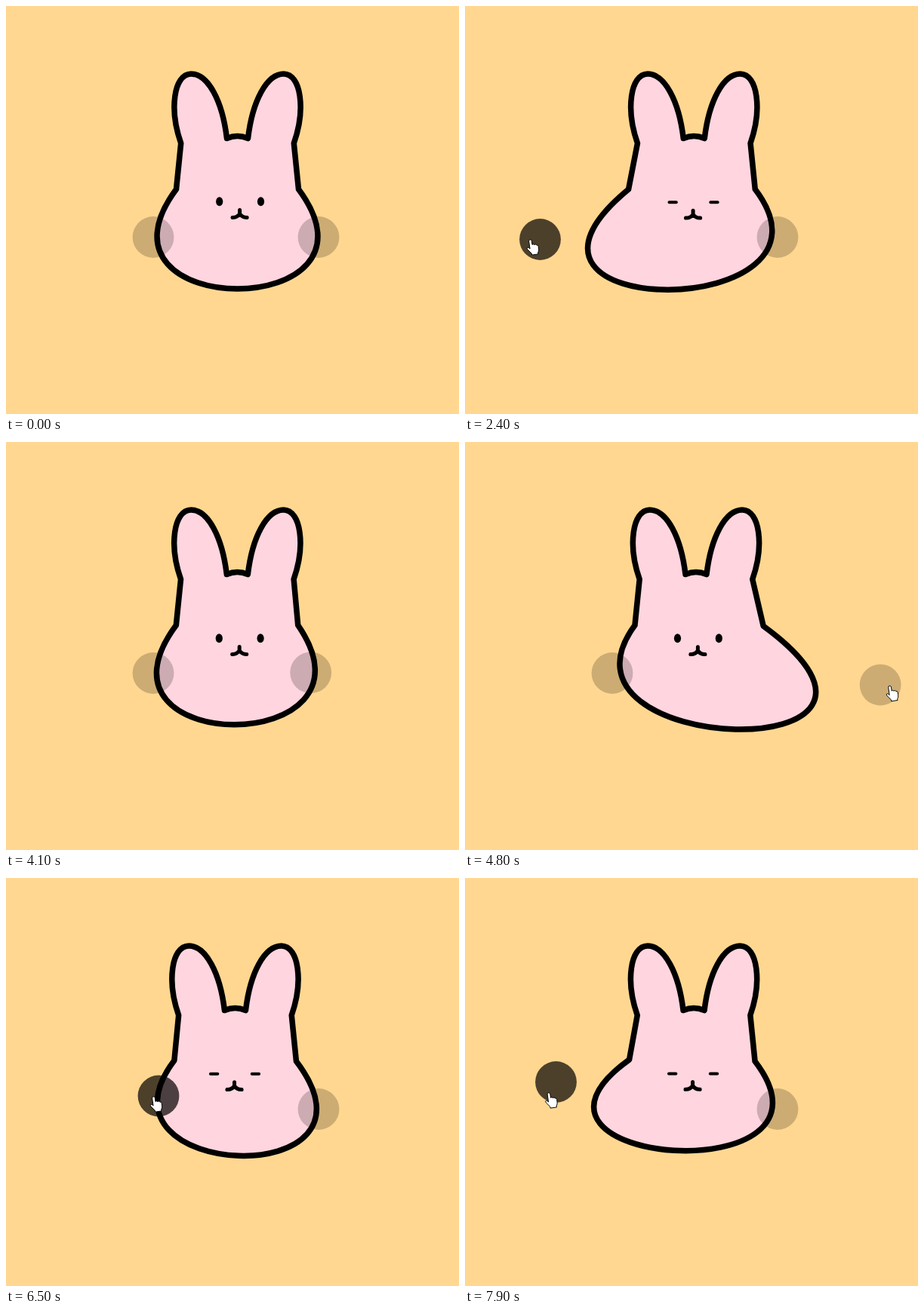
An HTML page for the animation above (8 s loop, 600 px wide and 541 px high).

```html
<!DOCTYPE html>
<html lang="en">
<head>
<meta charset="utf-8">
<title>Bunny cheeks</title>
<style>
html, body { margin: 0; width: 100%; height: 100%; overflow: hidden; background: #ffd790; }
svg { display: block; width: 100vw; height: 100vh; }
</style>
</head>
<body>
<svg viewBox="0 0 600 541">
  <rect width="600" height="541" fill="#ffd790"/>
  <path id="body" fill="#ffd5df" stroke="#000" stroke-width="7.5" stroke-linejoin="round"/>
  <g id="face">
    <g id="open">
      <ellipse cx="282.7" cy="259.2" rx="4.6" ry="6"/>
      <ellipse cx="337.5" cy="259.2" rx="4.6" ry="6"/>
    </g>
    <path id="shut" d="M278 259.5h9.4M332.8 259.5h9.4" stroke="#000" stroke-width="4" stroke-linecap="round"/>
    <path d="M309.6 270.5V275.5M300 280.4Q306.5 280.6 309.6 275.5Q312.7 280.6 319.2 280.4"
      fill="none" stroke="#000" stroke-width="5" stroke-linecap="round" stroke-linejoin="round"/>
  </g>
  <circle id="left" r="27.4"/>
  <circle id="right" r="27.4"/>
  <g fill="#fff" stroke="#000" stroke-linejoin="round">
    <path id="arrow" d="M0 0V16L3.8 12.6L6.6 18.6L9.2 17.4L6.4 11.6H11Z"/>
    <path id="hand" d="M-2 2Q-2 0 0 0T2 2V7.5Q3.5 6 5 8Q7 6.8 8.2 9Q10.3 8.7 10.3 11V15Q10.3 18 8.5 20V22H-.5V20L-5.5 13.5Q-7 11-5 10.5Q-3.6 10.5-2 13Z"/>
  </g>
</svg>
<script>
const LOOP = 8000, STEP = 100, AXIS = 306.5;
const $ = id => document.getElementById(id);
const rest = { left: [195, 306.5], right: [414, 306.5] };

// turning points of the pointer: time, x, y
const turns = [
  [1100, 600, 300], [1700, 480, 312], [2000, 182.5, 308], [2300, 27, 313], [2500, 147, 309],
  [2900, 202, 290], [3800, 587, 323], [4100, 555, 310], [4300, 588, 326], [4500, 427, 309],
  [4700, 575, 326], [5400, 361, 300], [5700, 189, 308.5], [6300, 57, 310], [6500, 196, 291],
  [6850, 57, 300], [7300, 186, 322], [7600, 24.5, 304], [7800, 26.5, 300], [8000, 196.5, 272]
];

const drags = [
  { side: 'left', from: 2000, to: 2500 },
  { side: 'right', from: 3400, to: 3900 },
  { side: 'right', from: 4500, to: 4800 },
  { side: 'left', from: 5700, to: 7000 },
  { side: 'left', from: 7300, to: LOOP }
];

const ease = u => u * u * (3 - 2 * u);

function pointer(t) {
  const i = turns.findIndex(p => p[0] > t);
  const [, ...b] = turns[i];
  if (i === 0) return b;
  const [t0, ...a] = turns[i - 1];
  const k = ease((t - t0) / (turns[i][0] - t0));
  return a.map((v, j) => v + (b[j] - v) * k);
}

// offset of a cheek from its rest place: held, or springing back
function cheek(side, t) {
  const drag = drags.filter(d => d.side === side && d.from <= t).pop();
  if (!drag) return { held: false, off: [0, 0] };
  const held = t < drag.to;
  const from = pointer(drag.from);
  const now = pointer(Math.min(t, drag.to));
  const s = (t - drag.to) / 1000;
  const k = held ? 1 : Math.exp(-10 * s) * Math.cos(2 * Math.PI * s / 0.3);
  return { held, off: now.map((v, i) => (v - from[i]) * k) };
}

// the face looks after the pointer with a short lag
function gaze(t) {
  let x = 0, y = 0;
  for (let i = 0; i < 4; i++) {
    const p = pointer(Math.max(0, t - i * 100));
    x += p[0] / 4;
    y += p[1] / 4;
  }
  return [(x - 600) * 0.0145, (y - 300) * 0.06];
}

function bodyPath(shift, l, r) {
  const at = (dx, y) => `${AXIS + dx + shift} ${y} `;
  const low = (side, off) => at(side * 81 + off[0] * 0.06, 243 + off[1] * 0.06);
  const pull = (side, off) => `${AXIS + side * 212 + off[0]} ${419 + off[1]} `;
  const ear = [[74.8, 182], [90.3, 138], [84.8, 90.5], [61.3, 90], [38.8, 90], [19.8, 126], [14, 175.6]];
  const [base, ...leftEar] = ear.map(([dx, y]) => at(-dx, y));
  const [inner, ...rightEar] = ear.map(([dx, y]) => at(dx, y)).reverse();
  return `M${base}C${leftEar.join('')}Q${at(0, 169.5)}${inner}C${rightEar.join('')}` +
    `L${low(1, r)}C${pull(1, r)}${pull(-1, l)}${low(-1, l)}Z`;
}

function show(id, on) {
  $(id).setAttribute('visibility', on ? 'visible' : 'hidden');
}

function draw(time) {
  const t = Math.floor((time % LOOP) / STEP) * STEP;
  const [x, y] = pointer(t);
  const [gx, gy] = gaze(t);
  const offs = {};
  let held = false, over = false;

  for (const side of ['left', 'right']) {
    const c = cheek(side, t);
    const [cx, cy] = rest[side].map((v, i) => v + c.off[i]);
    $(side).setAttribute('cx', cx);
    $(side).setAttribute('cy', cy);
    $(side).setAttribute('fill-opacity', c.held ? 0.7 : 0.2);
    offs[side] = c.off;
    held = held || c.held;
    over = over || Math.hypot(x - cx, y - cy) < 27;
  }

  $('body').setAttribute('d', bodyPath(gx * 0.43, offs.left, offs.right));
  $('face').setAttribute('transform', `translate(${gx} ${gy})`);

  const closed = held || (t >= 500 && t < 900);
  show('open', !closed);
  show('shut', closed);

  const inside = t >= 1300 && (t < 3900 || t >= 4300);
  const hand = held || over;
  show('hand', inside && hand);
  show('arrow', inside && !hand);
  $('hand').setAttribute('transform', `translate(${x - 0.8} ${y - 1.2}) rotate(-8) scale(0.93)`);
  $('arrow').setAttribute('transform', `translate(${x} ${y})`);
}

const start = performance.now();
function tick() {
  draw(performance.now() - start);
  requestAnimationFrame(tick);
}
tick();
</script>
</body>
</html>
```
